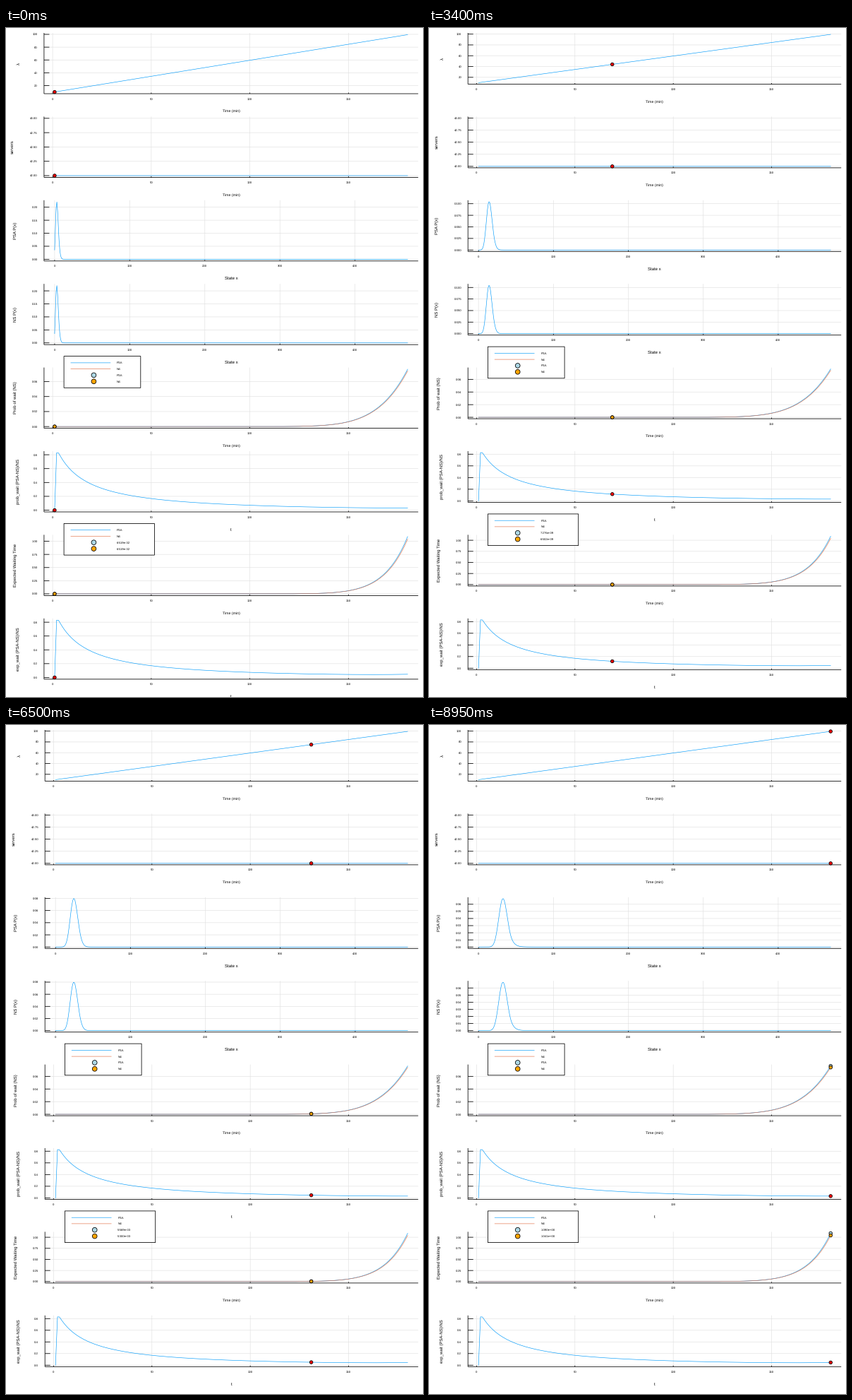
A matplotlib script that plays this animation: 591 by 947 pixels, repeating every 9 s.

```python
import numpy as np
import matplotlib.pyplot as plt
from matplotlib.animation import FuncAnimation
from matplotlib.collections import LineCollection
from matplotlib.patches import Circle, Rectangle

W, H, DPI = 591, 947, 64
PX = 72 / DPI
FRAMES, INTERVAL = 180, 50
BLUE, CORAL, GRID = "#009afa", "#e26f46", "#e0e0e0"
TOP, PITCH, RIGHT = 7, 118.4, 584.2
TICK, GUIDE = 4.2, 6.0
THIN, EDGE = 0.62 * PX, 0.8 * PX

plt.rcParams["font.family"] = "Liberation Sans"
plt.rcParams["text.hinting"] = "none"
plt.rcParams["path.snap"] = False

# ---- queue model: growing arrivals, fixed servers ----
SERVERS, MU, STATES, STEPS = 42, 3.0, 200, 200
t = np.arange(1, FRAMES + 1)
lam = 10 + 0.5 * (t - 1)
leave = MU * np.minimum(np.arange(1, STATES), SERVERS)


def steady(rate):
    w = np.cumprod(np.append(1.0, rate / leave))
    return w / w.sum()


def transient():
    """Solve the forward equations with fourth-order steps."""
    h = 1 / STEPS
    p = steady(lam[0])
    out = [p]
    flow = np.zeros(STATES + 1)
    for minute in range(FRAMES - 1):
        for s in range(STEPS):
            rate = lam[0] + 0.5 * (minute + (s + 0.5) * h)
            v = p
            for k in (4, 3, 2, 1):
                flow[1:-1] = rate * v[:-1] - leave * v[1:]
                v = p + (h / k) * (flow[:-1] - flow[1:])
            p = v
        out.append(p)
    return np.array(out)


psa = np.array([steady(r) for r in lam])
ns = transient()
queue = np.maximum(np.arange(STATES) - SERVERS, 0)
prob_psa, prob_ns = [d[:, SERVERS + 1:].sum(axis=1) for d in (psa, ns)]
wait_psa, wait_ns = [MU * (d @ queue) for d in (psa, ns)]
prob_gap = prob_psa / prob_ns - 1
wait_gap = wait_psa / wait_ns - 1
states = np.append(np.arange(STATES), 470)


def pmf_ticks(top):
    rules = ((0.15, 0.05), (0.125, 0.025), (0.12, 0.02), (0.1, 0.025), (0.07, 0.02))
    step = next((s for low, s in rules if top >= low), 0.01)
    return np.arange(0, top, step), 3 if step == 0.025 else 2


# ---- drawing in pixel coordinates ----
fig = plt.figure(figsize=(W / DPI, H / DPI), dpi=DPI, facecolor="white")


class Panel:
    def __init__(self, scene, row, xlim, xticks, xlabel, ylabel):
        self.scene, self.ax, self.left = scene, scene.ax, scene.left
        self.top = TOP + PITCH * row
        self.bottom = b = self.top + scene.height
        pad = 0.03 * (xlim[1] - xlim[0])
        self.x0 = xlim[0] - pad
        self.xs = (RIGHT - self.left) / (xlim[1] - xlim[0] + 2 * pad)
        self.labels = []
        self.grid = self.segments([], GRID, THIN, 1)
        self.marks = self.segments([], "black", EDGE, 4)
        pos = [self.x(v) for v in xticks]
        self.segments([[(x, self.top), (x, b)] for x in pos], GRID, THIN, 1)
        self.segments([[(x, b), (x, b - 1.5)] for x in pos], "black", EDGE, 4)
        self.segments([[(self.left, self.top), (self.left, b)],
                       [(self.left, b), (RIGHT, b)]], "black", EDGE, 4)
        for x, v in zip(pos, xticks):
            scene.text(x, b + 7, str(v), TICK)
        size = 5.3 if xlabel.startswith("Time") else GUIDE
        scene.text((self.left + RIGHT) / 2, b + 24.3, xlabel, size)
        self.guide = scene.text(0, (self.top + b) / 2, ylabel, GUIDE,
                                rotation=90, va="center")

    def segments(self, segs, color, width, z):
        lc = LineCollection(segs, colors=color, linewidths=width, zorder=z)
        return self.ax.add_collection(lc, autolim=False)

    def x(self, v):
        return self.left + (v - self.x0) * self.xs

    def y(self, v):
        return self.bottom - (v - self.y0) * self.ys

    def set_y(self, low, high, ticks, decimals):
        pad = 0.03 * (high - low)
        self.y0 = low - pad
        self.ys = (self.bottom - self.top) / (high - low + 2 * pad)
        pos = [self.y(v) for v in ticks]
        self.grid.set_segments([[(self.left, y), (RIGHT, y)] for y in pos])
        self.marks.set_segments([[(self.left, y), (self.left + 7.5, y)] for y in pos])
        while len(self.labels) < len(ticks):
            self.labels.append(self.scene.text(self.left - 9, 0, "", TICK, ha="right"))
        names = [f"{v:.{decimals}f}" for v in ticks]
        for i, label in enumerate(self.labels):
            label.set_visible(i < len(ticks))
            if i < len(ticks):
                label.set_text(names[i])
                label.set_y(pos[i])
        chars = max(map(len, names))
        shift = -1.7 if decimals == 0 else 3.7 * (chars - 3)
        self.guide.set_x(self.left - 37 - shift)

    def curve(self, xs, ys, color=BLUE):
        return self.ax.plot(self.x(xs), self.y(ys), color=color, lw=THIN, zorder=3)[0]


class Scene:
    def __init__(self, left, height):
        self.left, self.height = left, height
        self.ax = fig.add_axes([0, 0, 1, 1])
        self.ax.set_xlim(0, W)
        self.ax.set_ylim(H, 0)
        self.ax.axis("off")
        self.dots = []

        lam_p = self.timed(0, "Time (min)", "λ")
        lam_p.set_y(lam[0], lam[-1], range(20, 101, 20), 0)
        self.track(lam_p, lam)

        srv = self.timed(1, "Time (min)", "servers")
        srv.set_y(42, 43, np.linspace(42, 43, 5), 2)
        self.track(srv, np.full(FRAMES, 42.0))

        self.pmfs = []
        for row, (name, dist) in enumerate((("PSA P(x)", psa), ("NS P(x)", ns)), 2):
            p = Panel(self, row, (0, 470), range(0, 401, 100), "State x", name)
            p.set_y(0, 1, [0], 2)
            self.pmfs.append((p, dist, p.curve(states, states * 0)))

        prob = self.timed(4, "Time (min)", "Prob of wait (NS)")
        prob.set_y(0, prob_psa.max(), np.arange(4) * 0.02, 2)
        self.pair(prob, prob_psa, prob_ns)
        self.legend(prob, 108.7)

        gap = self.timed(5, "t", "prob_wait (PSA-NS)/NS")
        gap.set_y(0, prob_gap.max(), np.arange(5) * 0.2, 1)
        self.track(gap, prob_gap)

        wait = self.timed(6, "Time (min)", "Expected Waiting Time")
        wait.set_y(0, wait_psa.max(), np.arange(5) * 0.25, 2)
        self.pair(wait, wait_psa, wait_ns)
        self.values = self.legend(wait, 128.3)

        gap = self.timed(7, "t", "exp_wait (PSA-NS)/NS")
        gap.set_y(0, wait_gap.max(), np.arange(5) * 0.2, 1)
        self.track(gap, wait_gap)

    def timed(self, row, xlabel, ylabel):
        return Panel(self, row, (1, FRAMES), range(0, 151, 50), xlabel, ylabel)

    def text(self, x, y, s, size, ha="center", va="center_baseline", **kw):
        return self.ax.text(x, y, s, fontsize=size * PX, ha=ha, va=va,
                            color="black", zorder=8, **kw)

    def dot(self, x, y, color, radius, z):
        return self.ax.add_patch(Circle((x, y), radius, fc=color, ec="black",
                                        lw=EDGE, zorder=z))

    def follow(self, panel, data, color):
        self.dots.append((self.dot(0, 0, color, 2.25, 5), panel, data))

    def track(self, panel, data):
        panel.curve(t, data)
        self.follow(panel, data, "red")

    def pair(self, panel, first, second):
        panel.curve(t, first)
        panel.curve(t, second, CORAL)
        self.follow(panel, first, "lightblue")
        self.follow(panel, second, "orange")

    def legend(self, panel, width):
        x, y = self.left, panel.bottom - 102
        self.ax.add_patch(Rectangle((x + 28.2, y), width, 44.7, fc="white",
                                    ec="black", lw=EDGE, zorder=6))
        rows = y + np.array([9.3, 18, 26.8, 35.7])
        for row, color in zip(rows, (BLUE, CORAL)):
            self.ax.plot([x + 38, x + 94], [row, row], color=color, lw=THIN, zorder=7)
        for row, color in zip(rows[2:], ("lightblue", "orange")):
            self.dot(x + 70.5, row, color, 3.35, 7)
        names = [self.text(x + 103, row, s, TICK, ha="left")
                 for row, s in zip(rows, ("PSA", "NS") * 2)]
        return names[2:]

    def update(self, n):
        for dot, panel, data in self.dots:
            dot.set_center((panel.x(t[n]), panel.y(data[n])))
        for panel, dist, line in self.pmfs:
            p = dist[n]
            panel.set_y(0, p.max(), *pmf_ticks(1.03 * p.max()))
            line.set_ydata(panel.y(np.append(p, 0)))
        for label, data in zip(self.values, (wait_psa, wait_ns)):
            label.set_text(f"{data[n]:.3e}")


# The opening layout has slightly taller panels than the rest.
scenes = Scene(53.9, 86), Scene(55.2, 72.5)


def draw(n):
    current = scenes[min(n, 1)]
    for scene in scenes:
        scene.ax.set_visible(scene is current)
    current.update(n)
    return []


anim = FuncAnimation(fig, draw, frames=FRAMES, interval=INTERVAL,
                     repeat=True, repeat_delay=0, blit=False)
plt.show()
```
